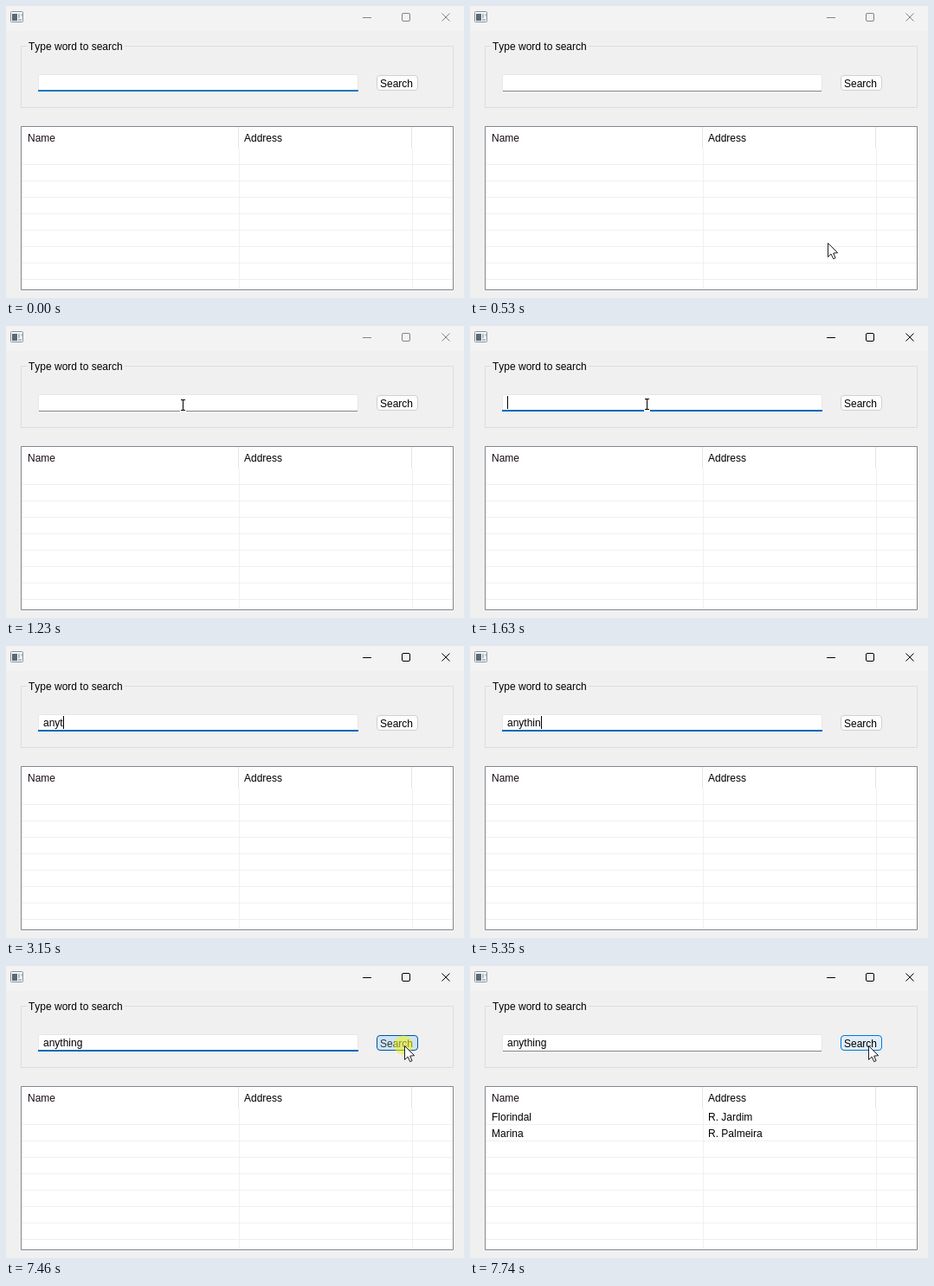
These frames come from a looping animation (529 px wide and 338 px high, 8000 ms). An HTML page with a canvas:

```html
<!DOCTYPE html>
<html lang="en">
<head>
<meta charset="utf-8">
<title>Search window</title>
<style>
  html, body { margin: 0; width: 100%; height: 100%; overflow: hidden; background: #f0f0f0; }
  canvas { display: block; width: 529px; height: 338px; }
</style>
</head>
<body>
<canvas id="stage" width="529" height="338"></canvas>
<script>
const ctx = document.getElementById('stage').getContext('2d');
const LOOP = 8000;

const typing = [
  [2360, 'a'], [2490, 'an'], [2820, 'any'], [3150, 'anyt'], [3360, 'anyth'],
  [3630, 'anythi'], [3900, 'anythin'], [4230, 'anythinm'], [5220, 'anythin'], [6030, 'anything']
];
const caretOn = [[1630, 2160], [2360, 4760], [5350, 5900], [6030, 6560], [7090, 7460]];
const rows = [['Florindal', 'R. Jardim'], ['Marina', 'R. Palmeira']];

// Pointer paths: time, x, y
const approach = [[460, 448, 303], [670, 342, 217], [880, 242, 141], [1090, 210, 105], [1230, 204, 92], [1290, 204, 91]];
const toButton = [[6430, 208, 91], [6640, 282, 88], [6850, 385, 87], [7050, 447, 91], [7190, 460, 92]];

const within = (t, a, b) => t >= a && t < b;
const clamp = v => Math.max(0, Math.min(1, v));
const ramp = (t, a, b) => clamp((t - a) / (b - a));
const mix = (a, b, k) => a + (b - a) * k;

// Time held on the recording's frame steps
const hold = (t, start, step = 70) => start + Math.floor((t - start) / step) * step;

function along(path, t) {
  if (t <= path[0][0]) return path[0].slice(1);
  for (let i = 1; i < path.length; i++) {
    const [t0, x0, y0] = path[i - 1], [t1, x1, y1] = path[i];
    if (t <= t1) {
      const k = (t - t0) / (t1 - t0);
      return [Math.round(mix(x0, x1, k)), Math.round(mix(y0, y1, k))];
    }
  }
  return path[path.length - 1].slice(1);
}

function fill(color, x, y, w, h) {
  ctx.fillStyle = color;
  ctx.fillRect(x, y, w, h);
}

function frame(color, x, y, w, h, radius = 0, inside) {
  ctx.beginPath();
  ctx.roundRect(x + 0.5, y + 0.5, w - 1, h - 1, radius);
  if (inside) {
    ctx.fillStyle = inside;
    ctx.fill();
  }
  ctx.strokeStyle = color;
  ctx.lineWidth = 1;
  ctx.stroke();
}

function label(str, x, y, color = '#000') {
  ctx.fillStyle = color;
  ctx.fillText(str, x, y);
}

function drawTitleBar(active) {
  fill('#f3f3f3', 0, 0, 529, 29);
  frame('#8b9298', 5, 6, 15, 13, 1, '#f4f6f7');
  fill('#596a75', 7, 9, 6, 8);
  fill('#b4bcc2', 14, 9, 2, 5);
  fill('#c9cfd3', 17, 9, 2, 3);
  fill('#b4bcc2', 14, 15, 4, 2);

  const ink = active ? '#000' : '#828282';
  fill(ink, 412, 13, 10, 1);
  frame(ink, 457, 8, 10, 10, 1.5);
  ctx.beginPath();
  ctx.moveTo(503.5, 8.5);
  ctx.lineTo(512.5, 17.5);
  ctx.moveTo(512.5, 8.5);
  ctx.lineTo(503.5, 17.5);
  ctx.stroke();
}

function drawField(t) {
  frame('#dcdcdc', 17, 46, 500, 72);
  fill('#f0f0f0', 24, 45, 113, 3);
  label('Type word to search', 26, 51);

  frame('#e6e6e6', 37, 79, 370, 20, 2, '#fff');
  fill('#868686', 38, 98, 368, 1);
  const focus = t < 190 ? 0.82 * (1 - ramp(hold(t, 0, 65), 0, 190))
    : t < 7460 ? ramp(hold(t, 1430) + 70, 1430, 1570)
    : 1 - ramp(hold(t, 7460), 7460, 7670);
  ctx.globalAlpha = focus;
  fill('#0067b8', 37, 97, 370, 2);
  ctx.globalAlpha = 1;

  const typed = typing.reduce((text, [at, value]) => t >= at ? value : text, '');
  label(typed, 43, 93);
  if (caretOn.some(([a, b]) => within(t, a, b))) {
    fill('#000', 43 + Math.round(ctx.measureText(typed).width), 81, 1, 15);
  }
}

function drawButton(t) {
  let edge = '#d0d0d0', face = '#fdfdfd', ink = '#000';
  if (within(t, 7460, 7600)) {
    [edge, face, ink] = ['#005499', '#cce4f7', '#333'];
  } else if (t >= 7250) {
    [edge, face] = ['#0078d4', '#e0eef9'];
  } else if (t >= 7050) {
    [edge, face] = ['#58a5de', '#eef5fb'];
  }
  frame(edge, 428, 80, 48, 18, 3.5, face);
  label('Search', 432, 94, ink);
}

function drawList(t) {
  frame('#828790', 17, 139, 500, 190, 0, '#fff');
  for (let y = 183; y < 328; y += 19) fill('#f0f0f0', 18, y, 498, 1);
  for (const x of [268, 468]) {
    fill('#e5e5e5', x, 140, 1, 25);
    fill('#f0f0f0', x + 1, 166, 1, 162);
  }

  const at = hold(t, 460);
  ctx.globalAlpha = ramp(at, 740, 880) * (1 - ramp(at, 880, 1020));
  fill('#d9ebf9', 19, 141, 249, 24);
  ctx.globalAlpha = 1;
  label('Name', 25, 157, within(t, 810, 950) ? '#1c2352' : '#1c0a16');
  label('Address', 275, 157);

  if (t >= 7600) {
    rows.forEach(([name, address], i) => {
      label(name, 25, 179 + 19 * i);
      label(address, 275, 179 + 19 * i);
    });
  }
}

function drawArrow(x, y) {
  ctx.save();
  ctx.translate(x + 0.5, y + 0.5);
  ctx.beginPath();
  [[0, 0], [0, 16], [3.6, 12.6], [6.2, 18.2], [8.6, 17.2], [6.2, 11.6], [11.2, 11.2]]
    .forEach(([px, py]) => ctx.lineTo(px, py));
  ctx.closePath();
  ctx.fillStyle = '#fff';
  ctx.fill();
  ctx.strokeStyle = '#1c1c28';
  ctx.lineWidth = 1;
  ctx.stroke();
  ctx.restore();
}

function drawIBeam(x, y) {
  fill('#fff', x - 3, y + 6, 7, 2);
  fill('#000', x, y - 7, 1, 13);
  for (const dy of [-7, 5]) {
    fill('#000', x - 2, y + dy, 2, 1);
    fill('#000', x + 1, y + dy, 2, 1);
  }
}

function drawPointer(t) {
  let pos;
  if (within(t, 460, 2220)) pos = along(approach, hold(t, 460));
  else if (t >= 6430) pos = along(toButton, hold(t, 6430, 69));
  else return;

  const [x, y] = pos;
  if (within(t, 1430, 1630) || within(t, 7460, 7600)) {
    ctx.globalAlpha = within(t, 1560, 1630) || within(t, 7530, 7600) ? 0.3 : 0.5;
    ctx.beginPath();
    ctx.arc(x - 1, y - 0.5, 11, 0, Math.PI * 2);
    ctx.fillStyle = '#f4f400';
    ctx.fill();
    ctx.globalAlpha = 1;
  }
  const overField = within(x, 37, 407) && within(y, 79, 99);
  (overField ? drawIBeam : drawArrow)(x, y);
}

function draw(t) {
  ctx.font = '12px "Liberation Sans", Arial, sans-serif';
  ctx.fontKerning = 'none';
  fill('#f0f0f0', 0, 0, 529, 338);
  drawTitleBar(t >= 1430);
  drawField(t);
  drawButton(t);
  drawList(t);
  drawPointer(t);
}

const start = performance.now();
function tick() {
  draw((performance.now() - start) % LOOP);
  requestAnimationFrame(tick);
}
tick();
</script>
</body>
</html>
```
